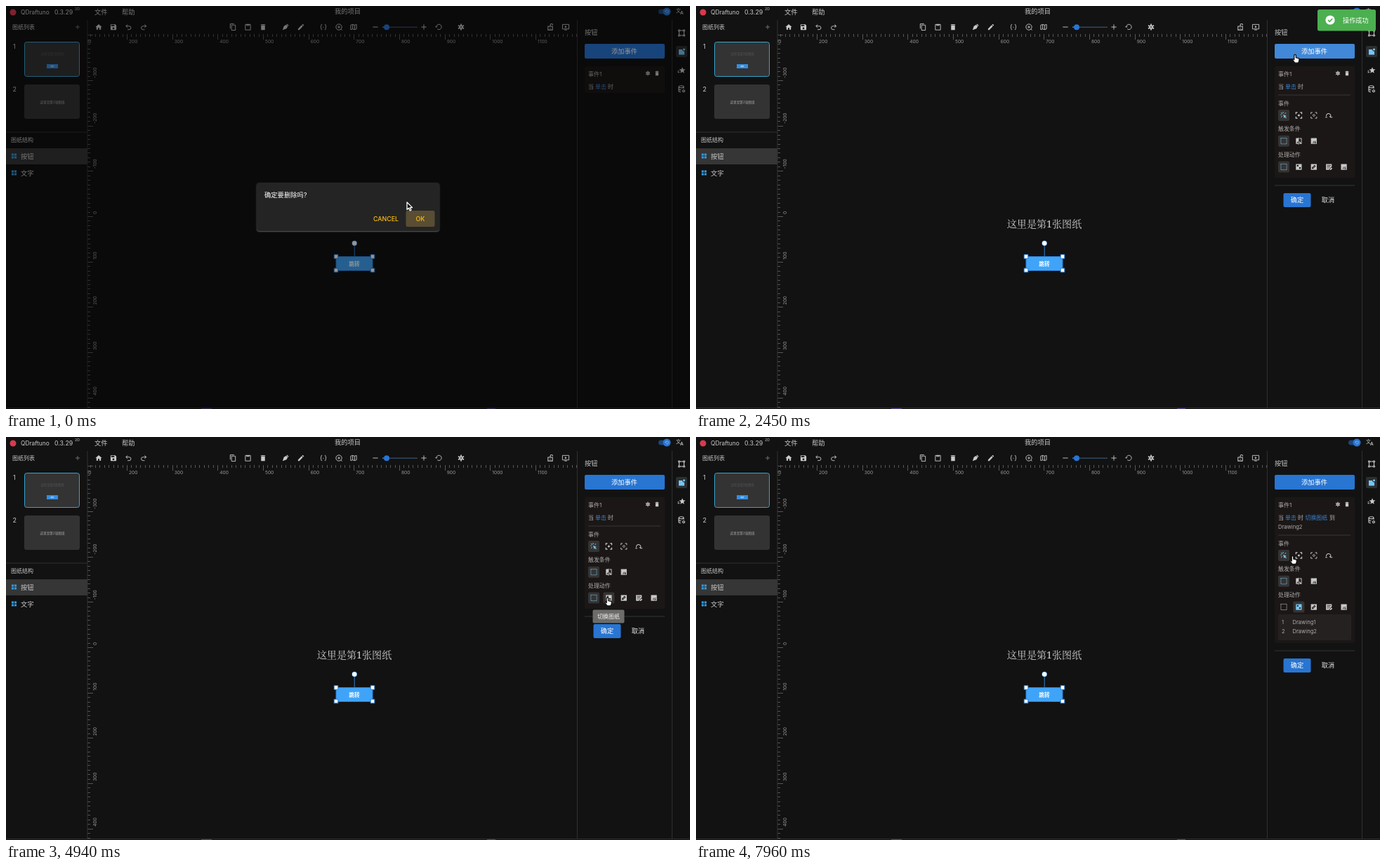
Recreate the animation shown at these times as an HTML page with a canvas. Size 974 px wide and 575 px high, loop 7990 ms.

```html
<!DOCTYPE html>
<html lang="zh-CN">
<head>
<meta charset="utf-8">
<title>图纸编辑器</title>
<style>
html, body { margin: 0; width: 100%; height: 100%; overflow: hidden; background: #121212 }
canvas { display: block }
</style>
</head>
<body>
<canvas id="stage" width="974" height="575"></canvas>
<script>
const LOOP = 7990;
const g = document.getElementById('stage').getContext('2d');
const SANS = 'Inter,"Noto Sans CJK SC","Noto Sans CJK",sans-serif';
const SERIF = '"Noto Serif","Noto Serif CJK SC","Noto Sans CJK SC",serif';
const LIGHT = '#c9c9c9', BLUE = '#2875d2', SKY = '#3fa4f8', LINK = '#3a86d6', PALE = '#78c5f2';

// Icons on a 24-unit grid: [path, stroke width, dash]; width 0 means filled
const ICONS = {
  home: ['M10 20v-6h4v6h5v-8h3L12 3 2 12h3v8z', 0],
  save: ['M17 3H5a2 2 0 0 0-2 2v14a2 2 0 0 0 2 2h14a2 2 0 0 0 2-2V7zm-5 16a3 3 0 1 1 0-6 3 3 0 0 1 0 6zm3-10H5V5h10z', 0],
  undo: ['M9 4L4 9l5 5M4 9h9a6 5 0 0 1 0 11H9', 2],
  redo: ['M15 4l5 5-5 5M20 9h-9a6 5 0 0 0 0 11h4', 2],
  copy: ['M16 2H4v15M8 6h12v16H8z', 2],
  paste: ['M4 4h16v17H4zM8 4h8v3H8z', 2],
  trash: ['M6 7h12v14H6zM5 4h14v2H5zM9 3h6v1H9z', 0],
  nib: ['M3 21L7 9l7-4 5 5-4 7zM15 4l2-2 5 5-2 2z', 0],
  pencil: ['M3 17.2V21h3.8L17.8 9.900 14 6.200zM20.700 7a1 1 0 0 0 0-1.400l-2.300-2.300a1 1 0 0 0-1.400 0l-1.900 1.800 3.800 3.800z', 0],
  braces: ['M8 4H7a2 2 0 0 0-2 2v4l-2 2 2 2v4a2 2 0 0 0 2 2h1M16 4h1a2 2 0 0 1 2 2v4l2 2-2 2v4a2 2 0 0 1-2 2h-1M11 13h2', 2],
  zoom: ['M12 3a9 9 0 1 0 .01 0M12 8v8M8 12h8M18 18l4 4', 2],
  map: ['M3 6l6-2 6 2 6-2v14l-6 2-6-2-6 2zM9 4v14M15 6v14', 2],
  minus: ['M4 12h16', 2],
  plus: ['M4 12h16M12 4v16', 2],
  reset: ['M5 12a8 8 0 1 1 3 6M2 10l3 3 3-3', 2],
  gear: ['M12 8a4 4 0 1 0 .01 0M12 2v4M12 18v4M3.300 7l3.500 2M17.200 15l3.500 2M3.300 17l3.500-2M17.200 9l3.500-2', 4],
  lock: ['M5 10h14v11H5zM12 10V6a4 4 0 0 1 8 0M12 14v3', 2.2],
  present: ['M2 4h20v14H2zM8 21h8M10.500 9l4 2.500-4 2.500z', 2],
  bounds: ['M7 5h10M7 19h10M5 7v10M19 7v10M3 3h4v4H3zM17 3h4v4h-4zM3 17h4v4H3zM17 17h4v4h-4z', 2],
  badge: ['M4 6h10a5 5 0 0 0 6 5v10H4zM19 3a3 3 0 1 1-.01 0', 0],
  star: ['M14 3l2.500 6 6.500.5-5 4 1.500 6.500-5.500-3.500-5.500 3.500 1.500-6.500-5-4 6.500-.5zM1 13h4v2H1zM1 17h5v2H1z', 0],
  data: ['M4 6a7 3 0 1 0 14 0a7 3 0 1 0-14 0v12a7 3 0 0 0 6 3M4 12a7 3 0 0 0 7 3M18 6v5M18 15a3 3 0 1 0 .01 0', 2.2],
  grid: ['M3 3h8v8H3zM13 3h8v8h-8zM3 13h8v8H3zM13 13h8v8h-8z', 0],
  click: ['M10 9l11 5-4.500 1.500 4 4-2 2-4-4L13 21zM9 1h2v5H9zM1 9h5v2H1zM3 4l1.400-1.400 3.500 3.500L6.500 7.500zM15 6l3-3 1.400 1.400-3 3zM3 17l3-3 1.400 1.400-3 3z', 0],
  focus: ['M3 8V3h5M16 3h5v5M21 16v5h-5M8 21H3v-5M12 10a2 2 0 1 0 .01 0', 2.6],
  blur: ['M3 8V3h5M16 3h5v5M21 16v5h-5M8 21H3v-5M12 9a3 3 0 1 0 .01 0', 2],
  cycle: ['M4 15a7 7 0 1 1 13 2M1 18h6M17 18h6M14 15l3 3', 2.2],
  none: ['M3 3h18v18H3z', 2, [2.6, 2]],
  compare: ['M10 3V1h2v22h-2v-2H3V3zM5 18h5v-6zM14 3h7v18h-7v-9l5 6V5h-5z', 0],
  script: ['M3 3h18v18H3zM10 12h1.500v6H8v-1.500h2zM14 12h4v1.500h-2.500v1.500H18v4h-4v-1.500h2.500v-1H14z', 0],
  swap: ['M3 3h18v18H3zM6 6h5v5H6zM13 13h5v5h-5z', 0],
  link: ['M3 3h18v18H3zM6 14l8-8 4 4-8 8H6z M9 14l5-5 1 1-5 5z', 0],
  edit: ['M3 3h18v8l-8 8v2H3zM6 7h12v1.500H6zM6 11h10v1.500H6zM6 15h6v1.500H6zM15 22v-3l5-5 3 3-5 5z', 0]
};
for (const k in ICONS) ICONS[k][0] = new Path2D(ICONS[k][0]);

const ARROW = new Path2D('M0 0V10.500L2.500 8.300 4.200 12 6 11.200 4.300 7.600H7.600z');
const HAND = new Path2D('M-1.300 1Q0-.8 1.300 1V4.500L5.800 5.700V9L4.500 12H-.3L-4 7.200-3 6.200-1.300 7.500z');
const BEAM = new Path2D('M-2.500-5Q0-5 0-3.500Q0-5 2.500-5M0-3.500V4M-2.500 5.500Q0 5.500 0 4Q0 5.500 2.500 5.500');

function text(s, x, y, size, color = LIGHT, align = 'left', weight = 400, family = SANS) {
  g.font = `${weight} ${size}px ${family}`;
  g.textAlign = align;
  g.fillStyle = color;
  g.fillText(s, x, y + size * .37);
}
function box(x, y, w, h, fill, r = 0, stroke) {
  g.beginPath();
  g.roundRect(x, y, w, h, r);
  if (fill) { g.fillStyle = fill; g.fill(); }
  if (stroke) { g.strokeStyle = stroke; g.lineWidth = 1; g.stroke(); }
}
function disc(x, y, r, fill) {
  g.beginPath();
  g.arc(x, y, r, 0, 7);
  g.fillStyle = fill;
  g.fill();
}
function icon(name, x, y, size = 11, color = LIGHT) {
  const [path, width, dash] = ICONS[name];
  g.save();
  g.translate(x, y);
  g.scale(size / 24, size / 24);
  g.translate(-12, -12);
  g.fillStyle = g.strokeStyle = color;
  g.lineWidth = width;
  g.setLineDash(dash || []);
  if (width) g.stroke(path); else g.fill(path, 'evenodd');
  g.restore();
}
function faded(alpha, draw) {
  if (alpha <= 0) return;
  g.save();
  g.globalAlpha = alpha;
  draw();
  g.restore();
}

const clamp = v => Math.max(0, Math.min(1, v));
const ramp = (t, a, b) => clamp((t - a) / (b - a));
const smooth = p => p * p * (3 - 2 * p);
const easeOut = p => 1 - (1 - p) ** 3;
// Interpolates rows of [time, ...values]
function track(rows, t, ease) {
  let i = 0;
  while (i < rows.length - 2 && t >= rows[i + 1][0]) i++;
  const [a, b] = [rows[i], rows[i + 1]];
  const p = ease(ramp(t, a[0], b[0]));
  return a.slice(1).map((v, k) => v + (b[k + 1] - v) * p);
}
const latest = (rows, t) => rows.filter(r => r[0] <= t).pop()[1];

const POINTER = [[0, 571, 280], [60, 571, 280], [220, 573, 299], [560, 573, 299], [1190, 854, 64],
  [2360, 854, 64], [2980, 838, 153], [3060, 838, 153], [3290, 844, 166], [3600, 843, 179],
  [4060, 843, 179], [4600, 856.5, 229], [6240, 856.5, 229], [6670, 866, 264.5], [7800, 866, 264.5], [7960, 849.5, 169.5]];
const SHAPES = [[0, 'arrow'], [160, 'hand'], [640, 'arrow'], [1120, 'hand'], [2560, 'arrow'], [2880, 'hand'],
  [3180, 'arrow'], [3500, 'beam'], [4240, 'arrow'], [4500, 'hand']];
const TOAST_IN = [[620, -1800], [1070, 20], [1182, -1], [1295, 6.5], [1370, 5]];
const TOAST_OUT = [[3270, 5], [3420, -1], [3570, 17], [4020, -1200]];

function ruler() {
  const step = 64.67;
  g.save();
  g.beginPath();
  g.rect(116, 40, 697, 533);
  g.clip();
  g.fillStyle = '#565656';
  for (let i = -12; i < 110; i++) {
    const len = i % 10 ? 4 : 8, at = Math.round(172 + i * step / 10);
    if (at > 115) g.fillRect(at, 40, 1, len);
  }
  for (let i = -40; i < 43; i++) {
    const len = i % 10 ? 4 : 8;
    g.fillRect(116, Math.round(300 + i * step / 10), len, 1);
  }
  for (let n = 1; n < 12; n++) text(n * 100, 175 + (n - 2) * step, 51, 6.6, '#999');
  for (let n = -3; n < 5; n++) {
    g.save();
    g.translate(127, 297 + n * step);
    g.rotate(-Math.PI / 2);
    text(n * 100, 0, 0, 6.6, '#999');
    g.restore();
  }
  g.restore();
}

function chrome() {
  box(0, 0, 974, 575, '#121212');
  ruler();
  disc(10, 9, 4.5, '#d83a4e');
  text('QDraftuno', 21, 9, 8.4);
  text('0.3.29', 69, 9, 8.8);
  text('2D', 98, 4.500, 5.2);
  text('文件', 126, 9, 9.3);
  text('帮助', 165, 9, 9.3);
  text('我的项目', 486.5, 8, 9.3, LIGHT, 'center');
  const bar = { home: 132, save: 153, undo: 174.5, redo: 196, copy: 323, paste: 344.5, trash: 366, nib: 398, pencil: 420,
    braces: 452, zoom: 474, map: 495, minus: 526, plus: 595, reset: 616, gear: 648, lock: 775, present: 797 };
  for (const k in bar) icon(k, bar[k], 30, 11);
  box(536, 29.5, 50, 1.5, '#30475f');
  box(536, 29.5, 6, 1.5, BLUE);
  disc(542, 30.3, 4, BLUE);

  box(929, 4.5, 16, 7, '#1b4679', 3.5);
  disc(941, 8, 5.500, BLUE);
  icon('reset', 941, 8, 6, '#dce9f8');
  text('文', 954, 6.500, 7);
  text('A', 960, 10, 6.500, LIGHT, 'left', 600);

  text('图纸列表', 9, 30, 8);
  icon('plus', 102, 30, 9, '#888');
  text('1', 10, 58, 9);
  text('2', 9.5, 119, 9);
  box(26.5, 51.5, 78, 49, '#333', 3, '#36a3cf');
  text('这里是第1张图纸', 66, 68, 4.400, '#5c5c5c', 'center', 400, SERIF);
  box(58, 83, 16, 6, '#378de0');
  text('跳转', 66, 86, 2.6, '#fff', 'center');
  box(26, 112, 79, 49, '#333', 3);
  text('这里是第2张图纸', 66, 137, 4.600, '#a8a8a8', 'center');
  text('图纸结构', 7, 191, 8);
  box(0, 203, 116, 23, '#363636');
  ['按钮', '文字'].forEach((s, i) => {
    icon('grid', 11.5, 214 + i * 24, 9.5, '#3398db');
    text(s, 21, 214.500 + i * 24, 9.3);
  });

  g.fillStyle = '#303030';
  g.fillRect(0, 179.5, 116, 1);
  g.fillRect(115.5, 20, 1, 553);
  g.fillRect(813, 20, 1, 553);
  g.fillRect(948, 20, 1, 553);
  g.fillRect(0, 573, 974, 1);
  g.fillStyle = '#50408f';
  g.fillRect(278, 574, 15, 1);
  g.fillRect(685, 574, 12, 1);

  box(954, 57, 16, 16, '#2b2f31', 2);
  ['bounds', 'badge', 'star', 'data'].forEach((k, i) => icon(k, 962, 38.5 + i * 26.6, 12, i == 1 ? PALE : LIGHT));
}

function drawing() {
  text('这里是第1张图纸', 496, 310.5, 14.1, '#cfcfcf', 'center', 400, SERIF);
  box(470, 357.500, 52, 20, SKY, 0, '#2d7fd0');
  text('跳转', 496, 368, 7.7, '#fff', 'center', 700);
  g.fillStyle = '#2d7fd0';
  g.fillRect(495.7, 341, 1, 16);
  disc(496.200, 338.5, 3.8, '#2d7fd0');
  disc(496.200, 338.5, 3.2, '#fff');
  for (const x of [470, 522]) for (const y of [357.5, 377]) box(x - 2.8, y - 2.8, 5.600, 5.600, '#fff', 0, '#2d7fd0');
}

function iconRow(names, y, active, hover) {
  names.forEach((k, i) => {
    const x = 837 + i * 21.4;
    if (i == active || i == hover) box(x - 8, y - 8, 16, 16, '#353433', 2);
    icon(k, x, y, 11, i == active ? PALE : LIGHT);
  });
}

function panel(t) {
  const hover = t > 1140 && t < 2560;
  text('按钮', 824, 37.5, 9.2);
  box(824, 54, 114, 21, hover ? '#4188d8' : BLUE, 2);
  text('添加事件', 880.5, 64.5, 9.3, '#fff', 'center');
  const old = t < 590, open = t >= 2290;
  if (!old && !open) return;

  const chosen = t >= 5820, named = t >= 7110;
  const dy = named ? 13 : 0, tail = dy + (chosen ? 36 : 0);
  box(824, 86, 114, open ? 159 + tail : 38, '#1b1716', 2);
  text('事件1', 829, 97, 8, '#b0adac');
  icon('gear', 914, 96, 8);
  icon('trash', 927, 96, 8.5);
  text('当', 829, 115, 7.9, '#b0adac');
  text('单击', 839, 115, 7.9, LINK);
  text('时', 857, 115, 7.9, '#b0adac');
  if (chosen) {
    text('切换图纸', 867.5, 115, 7.9, LINK);
    text('到', 902, 115, 7.9, '#b0adac');
  }
  if (named) text('Drawing2', 829, 128, 7.6, '#b0adac');
  if (!open) return;

  box(829, 126.5 + dy, 103, 1, '#3a3635');
  text('事件', 829, 139 + dy, 7.9, '#b0adac');
  iconRow(['click', 'focus', 'blur', 'cycle'], 156 + dy, 0);
  text('触发条件', 829, 175.500 + dy, 7.9, '#b0adac');
  iconRow(['none', 'compare', 'script'], 192.7 + dy, 0);
  text('处理动作', 829, 212.5 + dy, 7.9, '#b0adac');
  iconRow(['none', 'swap', 'link', 'edit', 'script'], 229.5 + dy, chosen ? 1 : 0, t > 4480 ? 1 : -1);
  if (chosen) {
    box(829, 240 + dy, 104, 37, '#242120', 2);
    [1, 2].forEach(n => {
      const y = 238.5 + n * 13 + dy;
      text(n, 834, y, 7.6, '#b0adac');
      text('Drawing' + n, 849.5, y, 7.6, '#b0adac');
    });
  }
  box(824, 255.5 + tail, 114, 1, '#343434');
  box(836.5, 267 + tail, 39, 20, BLUE, 2);
  text('确定', 856, 277 + tail, 9.2, '#fff', 'center');
  text('取消', 900, 277 + tail, 9.2, '#e4e4e4', 'center');
}

function tip(s, x, y, w, alpha) {
  faded(alpha * .95, () => {
    box(x - w / 2, y - 9.5, w, 19, '#737170', 2);
    text(s, x, y, 7.9, '#fff', 'center');
  });
}

function dialog(t) {
  const alpha = 1 - ramp(t, 430, 640);
  faded(alpha * .42, () => box(0, 0, 974, 575, '#000'));
  faded(alpha, () => {
    g.save();
    g.shadowColor = 'rgba(255,255,255,.35)';
    g.shadowBlur = 2;
    g.shadowOffsetY = 1;
    box(357, 252, 260, 69, '#242424', 4);
    g.restore();
    text('确定要删除吗?', 368, 270, 9.3, '#fff');
    text('CANCEL', 541, 303.5, 8.900, '#fdbd12', 'center', 500);
    box(569.5, 292, 41, 23, '#594d33', 2);
    text('OK', 590, 303.5, 8.900, '#fdbd12', 'center', 500);
  });
}

function toast(t) {
  if (t < 620 || t > 4020) return;
  const [y] = track(t < 3270 ? TOAST_IN : TOAST_OUT, t, t < 3270 ? easeOut : p => p);
  const alpha = t < 3270 ? ramp(t, 620, 1070) : 1 - ramp(t, 3570, 4020);
  faded(alpha, () => {
    box(885, y, 83, 30.5, '#4caf50', 2.5);
    disc(903, y + 15, 6.600, '#fff');
    g.strokeStyle = '#4caf50';
    g.lineWidth = 1.5;
    g.stroke(new Path2D(`M900 ${y + 15}l2.200 2.300 4-4.300`));
    text('操作成功', 921, y + 15.5, 9.2, '#fff');
  });
}

function pointer(t) {
  const shape = latest(SHAPES, t);
  g.save();
  g.translate(...track(POINTER, t, smooth));
  g.lineJoin = 'round';
  if (shape == 'beam') {
    for (const [color, w] of [['#fff', 2.2], ['#111', 1]]) {
      g.strokeStyle = color;
      g.lineWidth = w;
      g.stroke(BEAM);
    }
  } else {
    const hand = shape == 'hand', path = hand ? HAND : ARROW;
    g.lineWidth = 1.3;
    g.strokeStyle = hand ? '#111' : '#fff';
    g.fillStyle = hand ? '#fff' : '#111';
    g.fill(path);
    g.stroke(path);
  }
  g.restore();
}

function frame(now) {
  const t = now % LOOP;
  chrome();
  drawing();
  panel(t);
  tip('单击', 836.5, 181.5, 29, ramp(t, 3270, 3460) - ramp(t, 4070, 4240));
  tip('切换图纸', 858, 256, 45, ramp(t, 4650, 4880) - ramp(t, 6320, 6480));
  dialog(t);
  toast(t);
  pointer(t);
}

const start = performance.now();
(function tick() {
  frame(performance.now() - start);
  requestAnimationFrame(tick);
})();
</script>
</body>
</html>
```
